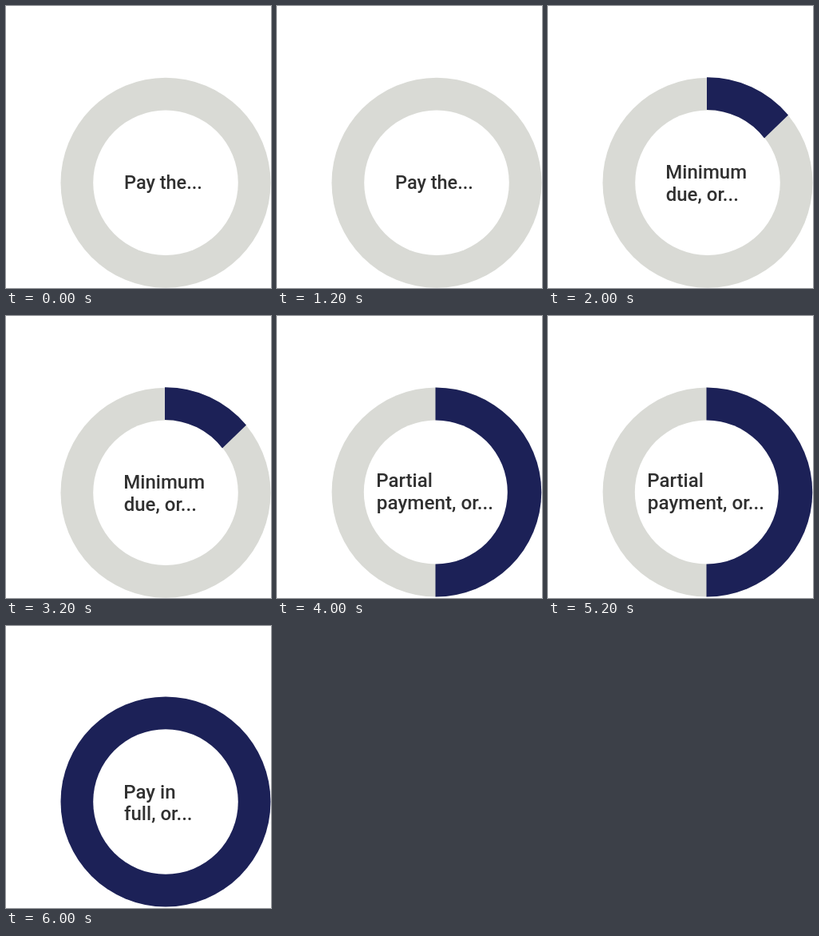
Animation, 332 px wide and 353 px high, one loop 8 s. Source, as an HTML page:

```html
<!DOCTYPE html>
<html lang="en">
<head>
<meta charset="utf-8">
<style>
html, body { margin: 0; width: 100%; height: 100%; overflow: hidden; background: #fff; }
svg { display: block; width: 332px; height: 353px; }
text { font: 500 24px Roboto, Arial, sans-serif; fill: #303030; }
.base { fill: #d9dad5; }
.paid { fill: #1c2157; }
.hole { fill: #fff; }
</style>
</head>
<body>
<svg viewBox="0 0 332 353">
  <g>
    <circle class="base" cx="200" cy="221.3" r="131.5"/>
    <circle class="hole" cx="200" cy="221.3" r="90.8"/>
    <text x="148" y="228.5" style="font-size: 23.5px">Pay the...</text>
  </g>
  <g>
    <circle class="base" cx="200" cy="221.2" r="131.5"/>
    <circle class="hole" cx="200" cy="221.2" r="90.8"/>
    <path class="paid" d="M199 89.3A131.5 131.5 0 0 1 301 136.6L271 165.6A91 91 0 0 0 199 129.9Z"/>
    <text x="147.3" y="216">Minimum</text>
    <text x="147.7" y="243.5">due, or...</text>
  </g>
  <g>
    <circle class="base" cx="199.5" cy="220.5" r="130.9"/>
    <path class="paid" d="M198.5 89.6A132.8 130.9 0 0 1 198.5 351.4Z"/>
    <circle class="hole" cx="198.8" cy="220.5" r="90"/>
    <text x="124.3" y="214">Partial</text>
    <text x="124.8" y="241.5" style="font-size: 24.3px">payment, or...</text>
  </g>
  <g>
    <circle class="paid" cx="200" cy="220" r="131.5"/>
    <circle class="hole" cx="200" cy="220" r="90.8"/>
    <text x="147.3" y="215.5">Pay in</text>
    <text x="148" y="243">full, or...</text>
  </g>
</svg>
<script>
const steps = document.querySelectorAll('g');
const start = performance.now();

function draw(now) {
  const current = Math.floor(Math.max(0, now - start) / 2000) % steps.length;
  steps.forEach((step, i) => step.style.display = i === current ? '' : 'none');
  requestAnimationFrame(draw);
}
draw(start);
</script>
</body>
</html>
```
